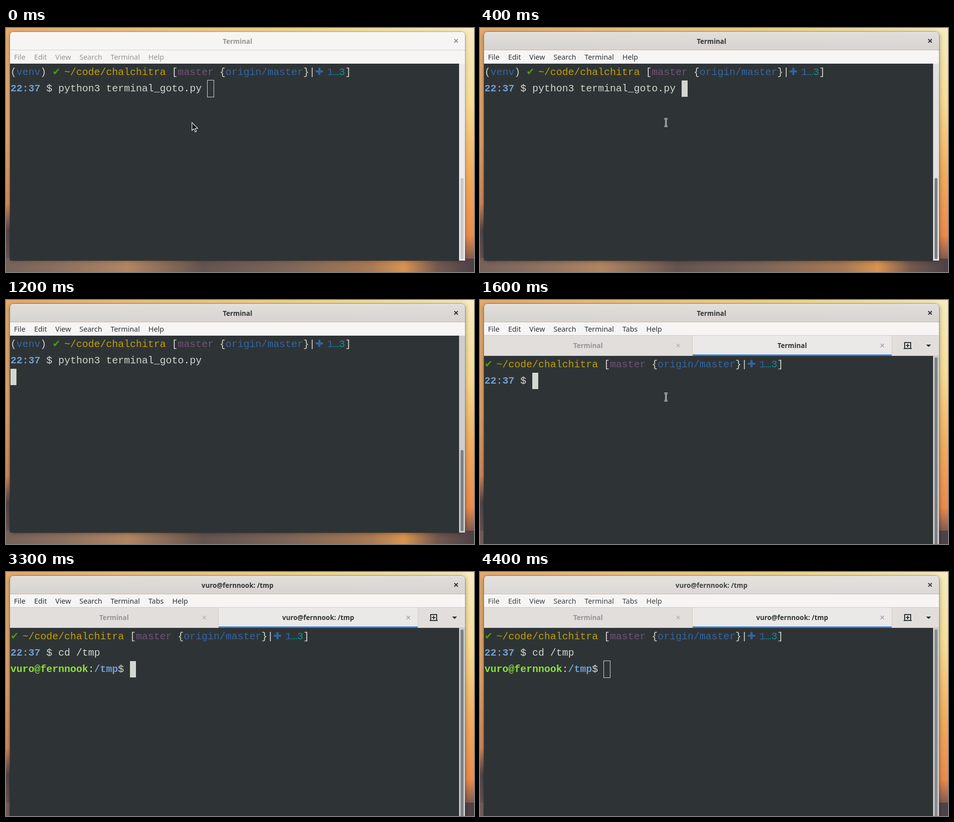
An HTML page that plays this animation: 940x493 px, repeating every 4.5 s.

```html
<!DOCTYPE html>
<html lang="en">
<head>
<meta charset="utf-8">
<title>Terminal</title>
<style>
html, body { margin: 0; width: 100%; height: 100%; overflow: hidden; background: #c99763; }
svg { display: block; width: 940px; height: 493px; }
.ui { font: 14.4px "Noto Sans", "Open Sans", sans-serif; }
.bold { font: 700 13.4px "Noto Sans", "Open Sans", sans-serif; text-anchor: middle; }
.term { font: 20px "Liberation Mono", monospace; }
.term .b { font-weight: 700; }
.term .sym { font-family: "DejaVu Sans", sans-serif; }
</style>
</head>
<body>
<svg viewBox="0 0 940 493" xmlns="http://www.w3.org/2000/svg">
  <defs>
    <linearGradient id="top">
      <stop offset="0" stop-color="#e5ac70"/><stop offset=".3" stop-color="#edc380"/>
      <stop offset=".65" stop-color="#f2d78f"/><stop offset="1" stop-color="#f7ebc0"/>
    </linearGradient>
    <linearGradient id="left" x2="0" y2="1">
      <stop offset="0" stop-color="#e5ac70"/><stop offset=".45" stop-color="#e5a468"/>
      <stop offset=".72" stop-color="#d48a5a"/><stop offset=".83" stop-color="#56474a"/>
      <stop offset=".93" stop-color="#66544f"/><stop offset="1" stop-color="#77615a"/>
    </linearGradient>
    <linearGradient id="right" x2="0" y2="1">
      <stop offset="0" stop-color="#f7ebc0"/><stop offset=".3" stop-color="#f7dc94"/>
      <stop offset=".6" stop-color="#f2ac5c"/><stop offset=".85" stop-color="#ee8a4a"/>
      <stop offset=".95" stop-color="#7d5a50"/><stop offset="1" stop-color="#4b4147"/>
    </linearGradient>
    <linearGradient id="bottom">
      <stop offset="0" stop-color="#77615a"/><stop offset=".12" stop-color="#8d705f"/>
      <stop offset=".26" stop-color="#b18562"/><stop offset=".42" stop-color="#64534f"/>
      <stop offset=".6" stop-color="#7d6558"/><stop offset=".78" stop-color="#a97953"/>
      <stop offset=".85" stop-color="#d99350"/><stop offset=".92" stop-color="#75594f"/>
      <stop offset="1" stop-color="#4b4147"/>
    </linearGradient>
    <linearGradient id="bar" x2="0" y2="1"><stop/><stop offset="1"/></linearGradient>
    <filter id="blur" x="-10%" y="-10%" width="120%" height="120%"><feGaussianBlur stdDeviation="5"/></filter>
  </defs>
  <rect width="940" height="12" fill="url(#top)"/>
  <rect width="12" height="493" fill="url(#left)"/>
  <rect x="918" width="22" height="493" fill="url(#right)"/>
  <rect y="466" width="940" height="27" fill="url(#bottom)"/>
  <g id="win"></g>
</svg>
<script>
const LOOP = 4500, STEP = 100;
const COL = 12, ROW = 33, LEFT = 9;
const C = {
  fg: '#d3d7cf', blue: '#3465a4', yellow: '#c4a000', purple: '#75507b',
  green: '#4e9a06', teal: '#06989a', sky: '#729fcf', lime: '#8ae234'
};
const HOST = 'vuro@fernnook';
const win = document.getElementById('win');
const barStops = document.querySelectorAll('#bar stop');

const clamp = v => Math.max(0, Math.min(1, v));
const mix = (a, b, k) => 'rgb(' + [1, 3, 5].map(i => {
  const p = parseInt(a.substr(i, 2), 16), q = parseInt(b.substr(i, 2), 16);
  return Math.round(p + (q - p) * k);
}) + ')';
const rect = (x, y, w, h, fill, extra = '') =>
  `<rect x="${x}" y="${y}" width="${w}" height="${h}" fill="${fill}" ${extra}/>`;
const label = (x, y, s, fill, cls) => `<text x="${x}" y="${y}" fill="${fill}" class="${cls}">${s}</text>`;
const cross = (x, y, r, color, w) =>
  `<path d="M${x - r} ${y - r}l${2 * r} ${2 * r}m0 ${-2 * r}l${-2 * r} ${2 * r}" stroke="${color}" stroke-width="${w}" fill="none"/>`;

// Lays out [text, colour, class] runs on the character grid.
function line(top, row, runs) {
  let col = 0, out = '';
  for (const [s, color, cls = ''] of runs) {
    if (s.trim()) out += label(LEFT + col * COL, top + row * ROW + 22, s, color, cls);
    col += s.length;
  }
  return out;
}

const gitPrompt = [
  ['✔', C.green, 'sym'], [' '], ['~/code/chalchitra', C.yellow], [' '], ['[', C.fg],
  ['master', C.purple], [' '], ['{', C.fg], ['origin/master', C.blue], ['}', C.fg], ['|', C.fg],
  ['✚', C.blue, 'sym'], [' '], ['1', C.blue], ['…', C.teal], ['3', C.teal], [']', C.fg]
];
const venv = [['(', C.fg], ['venv', C.blue], [')', C.fg], [' ']];
const command = s => [['22:37', C.sky, 'b'], [' '], ['$', C.fg], [' '], [s, C.fg]];
const hostPrompt = [[HOST, C.lime, 'b'], [':', C.fg], ['/tmp', C.sky, 'b'], ['$', C.fg]];

function caret(top, row, col, filled) {
  const x = LEFT + col * COL, y = top + row * ROW;
  return filled ? rect(x, y, COL, ROW, C.fg)
    : rect(x - .5, y - .5, COL + 1, ROW + 1, 'none', `stroke="${C.fg}"`);
}

function beam(x, y) {
  const d = `M${x - 3} ${y - 7.5}h2.5l.5 .5 .5-.5h2.5M${x} ${y - 7}v14M${x - 3} ${y + 7.5}h2.5l.5-.5 .5 .5h2.5`;
  return `<g fill="none"><path d="${d}" stroke="#fff" stroke-width="3"/><path d="${d}" stroke="#111" stroke-width="1"/></g>`;
}
const arrow = (x, y) =>
  `<path d="M${x} ${y}v16l3.7-3.4 2.8 6.4 2.6-1.2-2.7-6.1h5z" fill="#111" stroke="#fff" stroke-width="1.1"/>`;

function pointer(t) {
  if (t < 100) return arrow(373.5, 191);
  if (t < 500) return beam(373.5, 191);
  if (t < 1100 || (t >= 1600 && t < 1900)) return beam(373.5, 196);
  if (t >= 3700 && t < 4200) {
    const p = (t - 3700) / 500, x = 373.5 + 470 * p, y = 196 - 200 * p;
    return y > 113 ? beam(x, y) : arrow(x, y);
  }
  return '';
}

function frame(tabs, title, focus) {
  const height = tabs ? 503 : 462;
  const ink = mix('#929595', '#2e3436', focus);
  barStops[0].setAttribute('stop-color', mix('#f6f5f4', '#e1dedb', focus));
  barStops[1].setAttribute('stop-color', mix('#f6f5f4', '#d7d3cf', focus));
  const names = ['File', 'Edit', 'View', 'Search', 'Terminal', ...(tabs ? ['Tabs'] : []), 'Help'];
  const places = [16, 56.5, 99, 147.5, 210, 286, 334];
  let out = rect(7, 9, 916, height, '#000', `rx="8" filter="url(#blur)" opacity="${.2 + .15 * focus}"`)
    + rect(7.5, 7.5, 915, height + 1, 'none', 'rx="8" stroke="#000" stroke-opacity=".22"')
    + `<path d="M8 45V15a7 7 0 0 1 7-7H915a7 7 0 0 1 7 7V45z" fill="url(#bar)"/>`
    + `<path d="M10 10.5Q12 8.5 15 8.5H915Q918 8.5 920 10.5" fill="none" stroke="#fff" stroke-opacity=".6"/>`
    + rect(8, 44, 914, 1, mix('#d5d0cc', '#bfb8b1', focus))
    + rect(8, 45, 914, 27, '#f6f5f4')
    + label(465, 32, title, ink, 'bold')
    + cross(904, 26, 3.5, ink, 2);
  names.forEach((s, i) => out += label(places[i], 64, s, ink, 'ui'));
  return out;
}

function tabStrip(title) {
  return rect(8, 71, 914, 42, '#e1dedb') + rect(8, 71, 914, 1, '#d0cbc7')
    + rect(427, 72, 400, 41, '#ebe9e7') + rect(427, 110, 400, 3, '#3b7fd0')
    + rect(8, 112, 419, 1, '#cdc7c2') + rect(827, 112, 95, 1, '#cdc7c2')
    + rect(426, 72, 1, 41, '#d3cec9') + rect(827, 72, 1, 41, '#d3cec9')
    + label(217, 97, 'Terminal', '#929595', 'bold') + cross(398, 92, 3.5, '#b9b8b7', 1.6)
    + label(627, 97, title, '#2e3436', 'bold') + cross(808, 92, 3.5, '#a4a5a4', 1.6)
    + `<path d="M853 97V86h12v11M851 98h16M859 88.5v7M855.5 92h7" fill="none" stroke="#2e3436" stroke-width="2"/>`
    + `<path d="M896 90h10l-5 5z" fill="#2e3436"/>`;
}

function scrollbar(tabs, focus, trough) {
  const y = tabs ? 113 : 72;
  return rect(910, y, 12, tabs ? 398 : 398, mix('#eceaea', '#cdcdcd', trough))
    + rect(913, tabs ? 116 : 303, 6, tabs ? 392 : 164, mix('#c9c8c7', '#7e8182', focus), 'rx="3"');
}

function content(t, tabs, top, focused) {
  if (!tabs) {
    const entered = t >= 1200, visible = t < 800 || t >= 1100;
    return line(top, 0, [...venv, ...gitPrompt]) + line(top, 1, command('python3 terminal_goto.py'))
      + (visible ? caret(top, entered ? 2 : 1, entered ? 0 : 33, focused) : '');
  }
  const typed = t >= 1900, done = t >= 2000;
  const hidden = (t >= 2700 && t < 3300) || (t >= 3900 && t < 4300);
  return line(top, 0, gitPrompt) + line(top, 1, command(typed ? 'cd /tmp' : ''))
    + (done ? line(top, 2, hostPrompt) : '')
    + (hidden ? '' : done ? caret(top, 2, 20, focused) : caret(top, 1, typed ? 15 : 8, focused));
}

function draw(t) {
  const tabs = t >= 1600, top = tabs ? 114 : 73;
  const focus = t >= 4400 ? .85 : clamp((t - 200) / 200);
  const trough = clamp((t - 300) / 300);
  const title = t >= 2100 ? HOST + ': /tmp' : 'Terminal';
  const focused = t >= 300 && t < 4300;
  win.innerHTML = frame(tabs, title, focus)
    + rect(8, top - 1, 902, 398, '#2e3436')
    + (tabs ? tabStrip(title) : '')
    + scrollbar(tabs, focus, trough)
    + `<g class="term">${content(t, tabs, top, focused)}</g>`
    + pointer(t);
}

const start = performance.now();
let shown = -1;
function tick() {
  const t = Math.floor((performance.now() - start) % LOOP / STEP) * STEP;
  if (t !== shown) draw(shown = t);
  requestAnimationFrame(tick);
}
tick();
</script>
</body>
</html>
```
